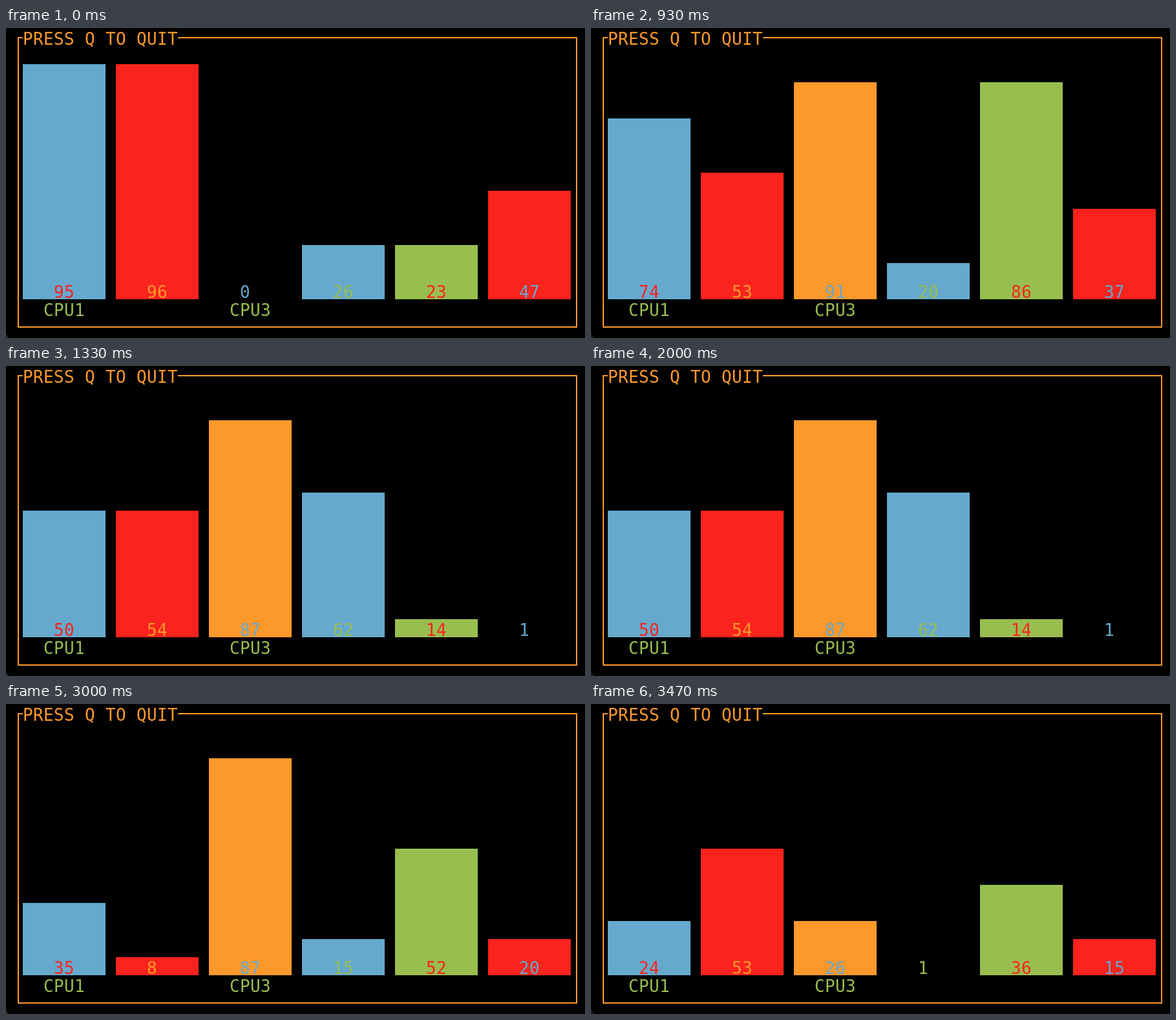
Animation, 896 px wide and 480 px high, one loop 3540 ms. Source, as an HTML page:

```html
<!DOCTYPE html>
<html lang="en">
<head>
<meta charset="utf-8">
<title>CPU bars</title>
<style>
  html, body { margin: 0; width: 100%; height: 100%; overflow: hidden; background: #000; }
  svg { display: block; width: 896px; height: 480px; }
  text { font: 26px "DejaVu Sans Mono", monospace; letter-spacing: .347px; white-space: pre; }
  #strip { animation: tick 3540ms step-end infinite; }
  /* one reading per second, each reading is one stage further right */
  @keyframes tick {
    0%     { transform: translateX(0); }
    9.2%   { transform: translateX(-896px); }
    37.4%  { transform: translateX(-1792px); }
    65.65% { transform: translateX(-2688px); }
    94%    { transform: translateX(-3584px); }
  }
</style>
</head>
<body>
<svg viewBox="0 0 896 480">
  <path d="M0 474L5 480H0Z" fill="#20201c"/>
  <path d="M26 15H19V463H883V15H266" fill="none" stroke="#fd992b" stroke-width="2"/>
  <text x="26" y="26" fill="#fd992b">PRESS Q TO QUIT</text>
  <g id="strip"></g>
  <g fill="#98be50">
    <text x="58" y="446">CPU1</text>
    <text x="346" y="446">CPU3</text>
  </g>
</svg>
<script>
  const ROW = 28, BASE = 420, STAGE = 896;
  const blue = '#66a9cd', red = '#fb231d', orange = '#fd992b', green = '#98be50';
  const barColors = [blue, red, orange, blue, green, red];
  const textColors = [red, orange, blue, green, red, blue];

  // values shown, and bar heights in terminal rows
  const readings = [
    { values: [95, 96, 0, 26, 23, 47],  rows: [13, 13, 0, 3, 3, 6] },
    { values: [74, 53, 91, 20, 86, 37], rows: [10, 7, 12, 2, 12, 5] },
    { values: [50, 54, 87, 62, 14, 1],  rows: [7, 7, 12, 8, 1, 0] },
    { values: [35, 8, 87, 15, 52, 20],  rows: [4, 1, 12, 2, 7, 2] },
    { values: [24, 53, 26, 1, 36, 15],  rows: [3, 7, 3, 0, 5, 2] }
  ];

  const bar = (value, rows, i) => {
    const x = 26 + 144 * i, h = rows * ROW;
    return `<rect x="${x}" y="${BASE - h}" width="128" height="${h}" fill="${barColors[i]}"/>
      <text x="${x + 48}" y="${BASE - 2}" fill="${textColors[i]}">${value}</text>`;
  };

  document.getElementById('strip').innerHTML = readings.map(({ values, rows }, n) =>
    `<g transform="translate(${n * STAGE})">${values.map((v, i) => bar(v, rows[i], i)).join('')}</g>`
  ).join('');
</script>
</body>
</html>
```
